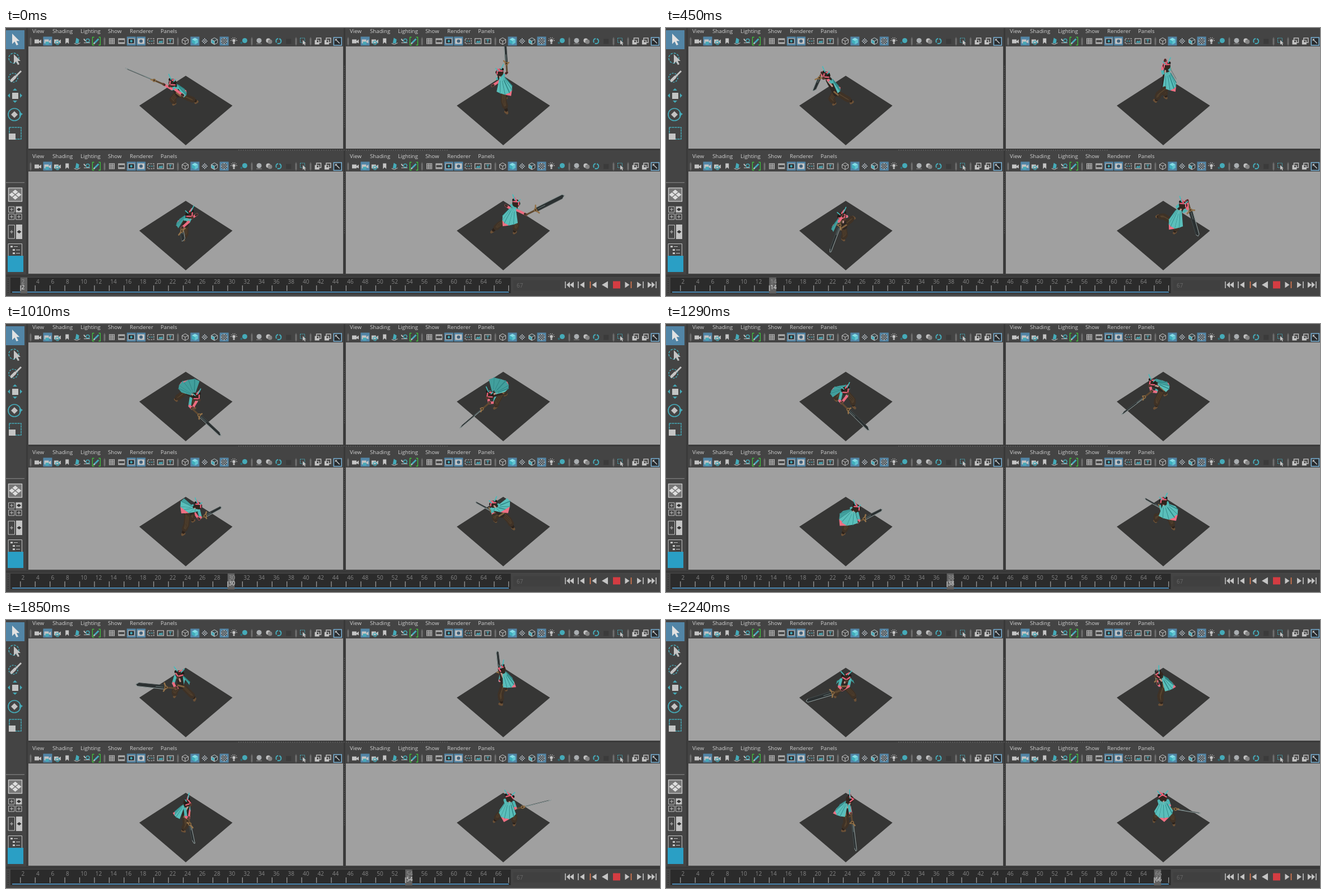
An HTML page with a canvas for the animation above (2260 ms loop, 1168x480 px).

```html
<!DOCTYPE html>
<html lang="en">
<head>
<meta charset="utf-8">
<title>Sword swing in four views</title>
<style>
html, body { margin: 0; width: 100%; height: 100%; overflow: hidden; background: #444; }
canvas { display: block; }
</style>
</head>
<body>
<canvas id="stage" width="1168" height="480"></canvas>
<script>
const W = 1168, H = 480, LOOP = 2260;
const FONT = '"Open Sans", "Noto Sans", sans-serif';
const LIGHT = '#c4c4c4', TEAL = '#45aab8', BLUE = '#5285a6', BG = '#444444';
const stage = document.getElementById('stage').getContext('2d');
const back = document.createElement('canvas');
back.width = W;
back.height = H;
let g = back.getContext('2d');

function rect(x, y, w, h, c) { g.fillStyle = c; g.fillRect(x, y, w, h); }
function box(x, y, w, h, c, lw = 1) { g.strokeStyle = c; g.lineWidth = lw; g.strokeRect(x, y, w, h); }
function trace(pts, close) {
  g.beginPath();
  pts.forEach(([x, y], i) => i ? g.lineTo(x, y) : g.moveTo(x, y));
  if (close) g.closePath();
}
function poly(pts, c) { trace(pts, true); g.fillStyle = c; g.fill(); }
function line(pts, c, lw = 1, cap = 'butt') {
  trace(pts);
  g.strokeStyle = c;
  g.lineWidth = lw;
  g.lineCap = cap;
  g.lineJoin = 'round';
  g.stroke();
}
function disc(x, y, r, c) { g.beginPath(); g.arc(x, y, r, 0, 7); g.fillStyle = c; g.fill(); }
function dashed(dash, draw) { g.setLineDash(dash); draw(); g.setLineDash([]); }
function ring(x, y, r, c, lw = 1, dash = []) {
  g.beginPath();
  g.arc(x, y, r, 0, 7);
  g.strokeStyle = c;
  g.lineWidth = lw;
  dashed(dash, () => g.stroke());
}
function text(s, x, y, c, size = 9.7) {
  g.font = size + 'px ' + FONT;
  g.fillStyle = c;
  g.fillText(s, x, y);
}
function diamond(x, y, w, h, c) { poly([[x - w, y], [x, y - h], [x + w, y], [x, y + h]], c); }
function plus(x, y) { rect(x - 3, y - .5, 6, 1, LIGHT); rect(x - .5, y - 3, 1, 6, LIGHT); }
function arrow(x, y, k, c) {
  poly([[0, 0], [0, 17], [4, 13], [7, 19], [10, 18], [7, 12], [12, 12]].map(p => [x + p[0] * k, y + p[1] * k]), c);
}

// Panel toolbar icons, drawn around 0,0
function separator() { rect(-1.5, -5, 3, 11, '#6b6b6b'); rect(-.5, -7, 1, 15, '#777'); }
const lit = draw => () => { rect(-8, -8, 16, 16, BLUE); draw(); };
function camera() { rect(-6, -3, 8, 7, LIGHT); poly([[2, 0], [6, -3], [6, 4], [2, 2]], LIGHT); }
function cameraLock() { camera(); rect(-4, 1, 6, 5, TEAL); }
function cameraGear() { camera(); ring(0, 3, 3, TEAL, 2.4, [1.7, .7]); }
function bookmark() { poly([[-3, -5], [3, -5], [3, 5], [0, 2], [-3, 5]], LIGHT); }
function plane() { poly([[-3, 4], [-1, -6], [4, -3], [3, 4]], TEAL); line([[-5, 4], [0, 6], [6, 3]], LIGHT); }
function zoom() { ring(2, -1, 3, TEAL, 1.4); line([[-5, 3], [6, 3]], LIGHT); line([[-5, -4], [-2, 0]], LIGHT, 2); }
function pencil() {
  for (const s of [-1, 1]) line([[4 * s, -7], [7 * s, -7], [7 * s, 7], [4 * s, 7]], '#3ec23e', 1.3);
  line([[-4, 4], [4, -4]], TEAL, 3);
  line([[-5, 5], [-3, 3]], LIGHT, 2);
}
function grid() { for (let i = -4.5; i < 6; i += 3) { line([[i, -5], [i, 5]], LIGHT); line([[-5, i], [5, i]], LIGHT); } }
function film() {
  rect(-6, -5, 12, 10, LIGHT);
  rect(-5, -2, 10, 4, BG);
  for (let i = -4; i < 6; i += 3) { rect(i, -4, 1, 1, BG); rect(i, 3, 1, 1, BG); }
}
function frame() { box(-5.5, -4.5, 11, 9, LIGHT, 1.2); }
function gate() { rect(-6, -5, 12, 10, '#252d33'); frame(); disc(0, 0, 2.2, TEAL); }
function mask() { rect(-6, -5, 12, 10, LIGHT); disc(0, 0, 3, '#40617a'); }
function chart() { dashed([3, 1.5], frame); rect(-3, -1, 2, 2, TEAL); rect(1, -1, 2, 2, TEAL); }
function picture() { frame(); poly([[-4, 3], [-1, -1], [1, 1], [3, -2], [4, 3]], TEAL); }
function title() { frame(); line([[-2.5, -2], [2.5, -2]], TEAL, 1.3); line([[0, -2], [0, 3]], TEAL, 1.3); }
function cube(top, left, right) {
  poly([[0, -6], [5.5, -3], [0, 0], [-5.5, -3]], top);
  poly([[-5.5, -3], [0, 0], [0, 6], [-5.5, 3]], left);
  poly([[5.5, -3], [0, 0], [0, 6], [5.5, 3]], right);
}
function wires() {
  line([[0, -6], [5.5, -3], [5.5, 3], [0, 6], [-5.5, 3], [-5.5, -3], [0, -6]], LIGHT);
  line([[-5.5, -3], [0, 0], [5.5, -3]], LIGHT);
  line([[0, 0], [0, 6]], LIGHT);
}
function solid() { cube('#83dce5', '#3fb0be', '#60c6d2'); }
function textured() { cube('#394b50', TEAL, '#303a3d'); wires(); }
function checker(r, c) {
  disc(0, 0, r, c);
  for (let i = -2; i < 3; i++) for (let j = -2; j < 3; j++) if ((i + j) & 1) rect(i * 2 - 1, j * 2 - 1, 2, 2, '#262f35');
}
function bulb() {
  disc(0, -1, 2.7, LIGHT);
  rect(-1.5, 2, 3, 3, LIGHT);
  for (let a = Math.PI; a < 6.5; a += Math.PI / 5)
    line([4, 6].map(r => [Math.cos(a) * r, Math.sin(a) * r - 1]), LIGHT);
}
function shadow() { disc(2, -1, 4.5, TEAL); disc(-4, 3, 2, '#2d6b74'); }
function occlusion() { disc(0, -1, 4.5, '#a9adb0'); rect(-5, 4, 10, 1.5, '#777'); }
function blur() { disc(-1, -1, 4, LIGHT); disc(2, 1, 4, '#858585'); }
function alias() { ring(0, 0, 4.5, TEAL, 2, [9, 2]); }
function dim() { rect(-4, -4, 9, 9, '#3b3b3b'); }
function pick() { dashed([2, 1], () => box(-5.5, -5.5, 8, 8, TEAL)); arrow(-1, -2, .5, LIGHT); }
function layers() { box(-2.5, -5.5, 8, 8, LIGHT, 1.4); rect(-5.5, -2, 8, 8, LIGHT); rect(-2, -1, 3, 3, BG); }
function corner() {
  box(-6.5, -6.5, 14, 14, '#79b5dc', 1.4);
  rect(-5, -5, 11, 11, '#272c30');
  line([[-3, -3], [4, 4]], LIGHT, 1.5);
  poly([[-4, -4], [0, -4], [-4, 0]], LIGHT);
}
const groups = {
  57: [camera, lit(cameraLock), cameraGear, bookmark, plane, zoom, pencil],
  189: [grid, film, lit(gate), lit(mask), chart, picture, title],
  320: [wires, lit(solid), () => checker(5, LIGHT), textured, lit(() => checker(6, '#aab3b8')), bulb, shadow],
  452: [occlusion, blur, alias, dim],
  531: [pick],
  557: [layers, layers, corner]
};
const menus = { View: 47, Shading: 83, Lighting: 133, Show: 182, Renderer: 221, Panels: 276 };
const views = [[0, 0], [567, 0], [0, 224], [567, 224]];

function place(x, y, draw) { g.save(); g.translate(x, y); draw(); g.restore(); }

function drawPanel() {
  for (const m in menus) text(m, menus[m], 9, '#d0d0d0');
  for (const x in groups) {
    place(x - 13, 23.5, separator);
    groups[x].forEach((icon, i) => place(+x + i * 17.4, 23.5, icon));
  }
  rect(40, 33, 562, 183, '#a0a0a0');
  poly([[321, 85.5], [404.5, 139], [321, 210], [238, 139]], '#363635');
}

function drawTools() {
  rect(0, 4, 33, 34, BLUE);
  arrow(11, 10, 1.1, '#e2e2e2');
  ring(14, 54, 9, TEAL, 1.5, [4, 2]);
  arrow(14, 47, 1, LIGHT);
  ring(13, 89, 8, TEAL, 1.5, [3, 2]);
  line([[27, 77], [16, 88]], LIGHT, 3);
  line([[16, 88], [10, 94]], LIGHT, 5, 'round');
  rect(11, 116, 11, 11, LIGHT);
  for (const [a, b] of [[1, 0], [-1, 0], [0, 1], [0, -1]])
    poly([[16 + a * 13, 121 + b * 13], [16 + a * 9 + b * 4, 121 + b * 9 + a * 4], [16 + a * 9 - b * 4, 121 + b * 9 - a * 4]], TEAL);
  ring(15, 155, 11, TEAL, 1.7);
  poly([[24, 150], [30, 154], [24, 159]], TEAL);
  diamond(15, 155, 6, 6, LIGHT);
  dashed([3, 2], () => box(6, 178, 21, 21, TEAL, 1.5));
  rect(5, 189, 12, 11, LIGHT);
  rect(0, 276, 33, 1.5, '#777');

  rect(4, 286, 25, 25, '#777');
  box(4.5, 286.5, 24, 24, LIGHT, 1.5);
  for (const [a, b] of [[0, -5], [0, 5], [-6, 0], [6, 0]]) diamond(16.5 + a, 298.5 + b, 5, 4, '#dedede');
  for (const x of [10, 23]) for (const y of [325, 338]) {
    if (x > 20 && y < 330) {
      rect(x - 5.5, y - 5.5, 11, 11, LIGHT);
      diamond(x, y, 4, 3, '#333');
    } else {
      box(x - 5, y - 5, 10, 10, LIGHT);
      plus(x, y);
    }
  }
  box(4.5, 353, 11, 24, LIGHT);
  plus(10, 365);
  rect(18, 352, 11, 26, LIGHT);
  diamond(23.5, 365, 4, 3, '#333');
  box(4.5, 386.5, 24, 24, LIGHT);
  for (let i = 0; i < 3; i++) { rect(i ? 12 : 8, 390 + i * 6, 4, 3, LIGHT); rect(i ? 18 : 14, 391 + i * 6, 7, 1, LIGHT); }
  rect(3, 408, 28, 29, '#2a9fc5');
}

const tickX = f => 25.6 + (f - 2) * 13.22;

function drawTimeline() {
  rect(0, 441, W, 1, '#383838');
  rect(0, 443, W, 2, '#333');
  rect(8, 447, 893, 28, '#2b2b2b');
  rect(11, 472, 887, 2, '#4d8ab4');
  for (let f = 2; f <= 66; f += 2) {
    rect(tickX(f) - .5, 461, 1.3, 10, '#999');
    text(f, tickX(f) + 2, 457.5, '#858585', 10);
  }
  rect(897, 461, 1.3, 10, '#999');
  rect(901, 447, 1, 28, '#363636');
  for (let y = 449; y < 475; y += 4) rect(3, y, 1.5, 1.5, '#2e2e2e');
  rect(906, 452, 84, 18, '#404040');
  text('67', 912, 465, '#686868', 10);

  // Each button is mirrored around the stop square
  const tri = (x, dir, w = 8) => poly([[x + dir * w / 2, 460], [x - dir * w / 2, 454.5], [x - dir * w / 2, 465.5]], LIGHT);
  const bar = (x, c = LIGHT) => rect(x - .8, 454, 1.6, 12, c);
  for (const dir of [-1, 1]) {
    const x = d => 1080 + dir * d;
    bar(x(81), LIGHT); tri(x(76), dir, 6); tri(x(69.5), dir, 7);
    bar(x(58)); tri(x(51), dir);
    bar(x(36.5), '#e07a50'); tri(x(29.5), dir);
  }
  poly([[1064, 460], [1075, 453.5], [1075, 466.5]], LIGHT);
  rect(1084, 453.5, 13, 13, '#d43c42');
}

function drawBack() {
  rect(0, 0, W, H, BG);
  rect(36, 0, 3, 441, '#3a3a3a');
  rect(603, 0, 3, 441, '#393939');
  rect(40, 217, W - 40, 2, '#393939');
  for (let x = 415; x < 790; x += 4) rect(x, 218, 1.5, 1.5, '#666');
  for (let y = 68; y < 180; y += 4) { rect(604, y, 1, 1.5, '#666'); rect(604, y + 190, 1, 1.5, '#666'); }
  views.forEach(([x, y]) => place(x, y, drawPanel));
  drawTools();
  drawTimeline();
}

// Points are [right, toward viewer, up] on the floor; angles in degrees.
// Each move eases its changes in between two steps.
const opening = { head: [-.25, .07, .7], foot: [.25, -.08, .04], lift: -.16, yaw: -4, pitch: 147, roll: -45, cape: -42, open: 1 };
const moves = [
  { from: 0, to: 13, head: [-.12, -.14, .07], foot: [-.11, .23, .23], lift: .25, yaw: 50, pitch: 96, roll: 25, open: -1 },
  { from: 14, to: 24, head: [.58, .33, -.36], foot: [.02, 0, -.27], lift: -.4, cape: -90 },
  { from: 17, to: 26, pitch: -253, roll: -55 },
  { from: 29, to: 37, head: [-.21, -.04, .12] },
  { from: 36, to: 47, head: [-.19, -.22, .17], foot: [.04, -.12, 0], lift: -.06, pitch: 40, roll: -55, cape: 74 },
  { from: 36, to: 50, yaw: 128 },
  { from: 46, to: 64, head: [.2, .08, -.05], lift: .06, pitch: -48, cape: -35 }
];

const add = (a, b, k = 1) => a.map((v, i) => v + b[i] * k);
const mix = (a, b, k) => a.map((v, i) => v + (b[i] - v) * k);
const polar = (a, r = 1, h = 0) => [Math.cos(a) * r, Math.sin(a) * r, h];
const rad = d => d * Math.PI / 180;
const ease = t => { t = Math.min(1, Math.max(0, t)); return t * t * (3 - 2 * t); };

function poseAt(step) {
  const p = { ...opening };
  for (const { from, to, ...change } of moves) {
    const k = ease((step - from) / (to - from));
    for (const key in change)
      p[key] = Array.isArray(p[key]) ? add(p[key], change[key], k) : p[key] + change[key] * k;
  }
  const { head, open } = p;
  const yaw = rad(p.yaw), pitch = rad(p.pitch), roll = rad(p.roll);
  p.hip = [head[0] * .4 - .05, head[1] * .2 - .02, .33];
  p.neck = mix(p.hip, head, .76);
  p.capeYaw = rad(p.cape);
  p.rear = polar(p.capeYaw);
  p.side = polar(p.capeYaw + Math.PI / 2);
  p.reach = .24 + .4 * Math.max(0, head[1]);
  p.hemHeight = .34 + 1.5 * Math.max(0, .53 - head[2]);
  p.grip = add(head, [-.08 - .12 * open, .03 - .18 * open, p.lift]);
  p.off = add(p.grip, [.4, .3, -.02], open);
  p.aim = polar(yaw, Math.cos(pitch), Math.sin(pitch));
  p.edge = add(polar(yaw + Math.PI / 2, Math.cos(roll)), polar(yaw, -Math.sin(pitch), Math.cos(pitch)), Math.sin(roll));
  p.feet = [[-.23, -.07, 0], p.foot];
  return p;
}

const turns = [(u, v) => [u, v], (u, v) => [-v, u], (u, v) => [v, -u], (u, v) => [-u, -v]];

function drawFigure(p, turn) {
  const depth = q => 1 - .145 * turn(q[0], q[1])[1] - .156 * q[2];
  const at = q => {
    const [u, v] = turn(q[0], q[1]), d = depth(q);
    return [321 + 83 * u / d, 139 + (60.7 * v - 57 * q[2]) / d];
  };
  const path = (pts, c, w) => line(pts.map(at), c, w, 'round');
  const parts = [];
  const part = (q, draw, bias = 0) => parts.push([depth(q) + bias, draw]);
  const { head, neck, hip, side, rear, grip, aim, edge } = p;

  p.feet.forEach((foot, i) => {
    const k = i ? 1 : -1;
    const top = add(hip, [.04 * k, 0, 0]);
    const knee = add(add(mix(top, foot, .52), rear, -.05), [.03 * k, 0, .03]);
    const shin = mix(knee, foot, .4);
    part(knee, () => {
      path([mix(knee, foot, .75), foot, add(foot, rear, -.05)], '#6b5036', 4.5);
      path([shin, mix(knee, foot, .75)], '#2d231c', 5.5);
      path([top, knee, shin], '#3f3226', 10.5);
      for (const s of [-.035, 0, .035]) path([add(top, side, s), add(knee, side, s), add(shin, side, s / 2)], '#58452f', 1);
    });
  });

  part(mix(hip, neck, .5), () => {
    path([hip, neck], '#2f2723', 11);
    path([mix(hip, neck, .55), add(neck, rear, -.03)], '#c0968a', 3);
    path([add(hip, side, -.06), add(hip, side, .06)], '#80623f', 3);
  });

  [p.off, grip].forEach((hand, i) => {
    const k = i ? 1 : -1;
    const shoulder = add(neck, side, .09 * k);
    const elbow = add(add(mix(shoulder, hand, .5), side, .05 * k), [0, 0, -.04]);
    part(mix(elbow, hand, .3), () => {
      path([shoulder, elbow], '#4eb5b3', 5);
      path([elbow, hand], '#ec6b80', 4.5);
      path([mix(elbow, hand, .85), hand], '#403029', 4);
    });
  });

  // The cape is part of a cone that opens behind the neck
  const folds = 6;
  const ray = (j, r, h) => add([neck[0], neck[1], 0], polar(p.capeYaw + (j / folds - .5) * 2.3, r, h));
  const hem = j => {
    const c = Math.cos((j / folds - .5) * 2.3);
    return ray(j, p.reach * (.6 + .4 * c), p.hemHeight + .06 * (1 - c) + (j % 2) * .02);
  };
  const collar = j => ray(j, .06, neck[2] + .02);
  part(add(hem(folds / 2), rear, -.02), () => {
    const dip = add(add(hem(folds / 2), rear, .05), [0, 0, -.06]);
    poly([hem(2), dip, hem(4)].map(at), '#ee7084');
  });
  for (let j = 0; j < folds; j++) {
    const quad = [collar(j), collar(j + 1), hem(j + 1), hem(j)];
    const mid = mix(quad[0], quad[2], .6);
    part(mid, () => {
      const outside = depth(mid) < depth([neck[0], neck[1], mid[2]]);
      poly(quad.map(at), outside ? '#5abfbb' : '#429f9d');
      if (j) path([mix(quad[0], quad[3], .2), quad[3]], '#2f8686', j % 2 ? 1.6 : .8);
    });
  }

  part(head, () => {
    const [x, y] = at(head), r = 6.3 / depth(head);
    const face = add(head, rear, -.07);
    disc(x, y, r, '#33261f');
    for (const k of [-1, 1]) disc(...at(add(add(head, side, k * .07), [0, 0, .04])), 2.6, '#211b19');
    path([add(head, side, -.07), face, add(head, side, .07)], '#e8637a', 2.3);
    if (depth(face) < depth(head)) disc(at(face)[0], at(face)[1] + 2.2, 2.6, '#54382d');
    path([add(head, [0, 0, .07]), add(add(head, side, .06), [0, 0, .11])], '#e8637a', 2.6);
    for (const k of [-1, 1])
      path([add(add(head, side, k * .04), [0, 0, .06]), add(add(head, side, k * .1), [0, 0, .15])], '#45bcbc', 1.7);
  }, -.01);

  const guard = add(grip, aim, .2), tip = add(grip, aim, .79);
  part(mix(grip, tip, .5), () => {
    const blade = [
      add(guard, edge, .038), add(add(tip, aim, -.03), edge, .034), tip,
      add(add(tip, aim, -.05), edge, -.034), add(guard, edge, -.038)
    ].map(at);
    poly(blade, '#2b3031');
    line([...blade, blade[0]], '#454d4e', 1);
    line(blade.slice(0, 4), '#a9b6b5', .8);
    path([add(guard, aim, .05), add(guard, aim, .2)], '#7b9190', .8);
    path([grip, guard], '#604a32', 3);
    path([1, 0, -1].map(k => add(add(guard, edge, k * .08), aim, .04 * k * k)), '#94734a', 2.6);
    disc(...at(guard), 3, '#8b6b43');
    disc(...at(guard), 1.3, '#342b22');
  });

  g.beginPath();
  g.rect(40, 33, 562, 183);
  g.clip();
  parts.sort((a, b) => b[0] - a[0]).forEach(q => q[1]());
}

function drawCursor(f) {
  const x = tickX(f);
  rect(x, 447, 12.5, 28, '#626262');
  text(f, x + 2, 457.5, '#979797', 10);
  rect(x, 461, 1.3, 10, '#bbb');
  text(f, x + 2, 467.5, '#f2f2f2', 10);
}

drawBack();
g = stage;
const start = performance.now();

function draw(now) {
  const t = Math.max(0, now - start) % LOOP;
  const step = Math.min(64, Math.floor((t + 4) / 34.85));
  const pose = poseAt(step);
  g.drawImage(back, 0, 0);
  views.forEach(([x, y], i) => place(x, y, () => drawFigure(pose, turns[i])));
  drawCursor(2 + 2 * Math.floor(step / 2));
  requestAnimationFrame(draw);
}
draw(start);
</script>
</body>
</html>
```
